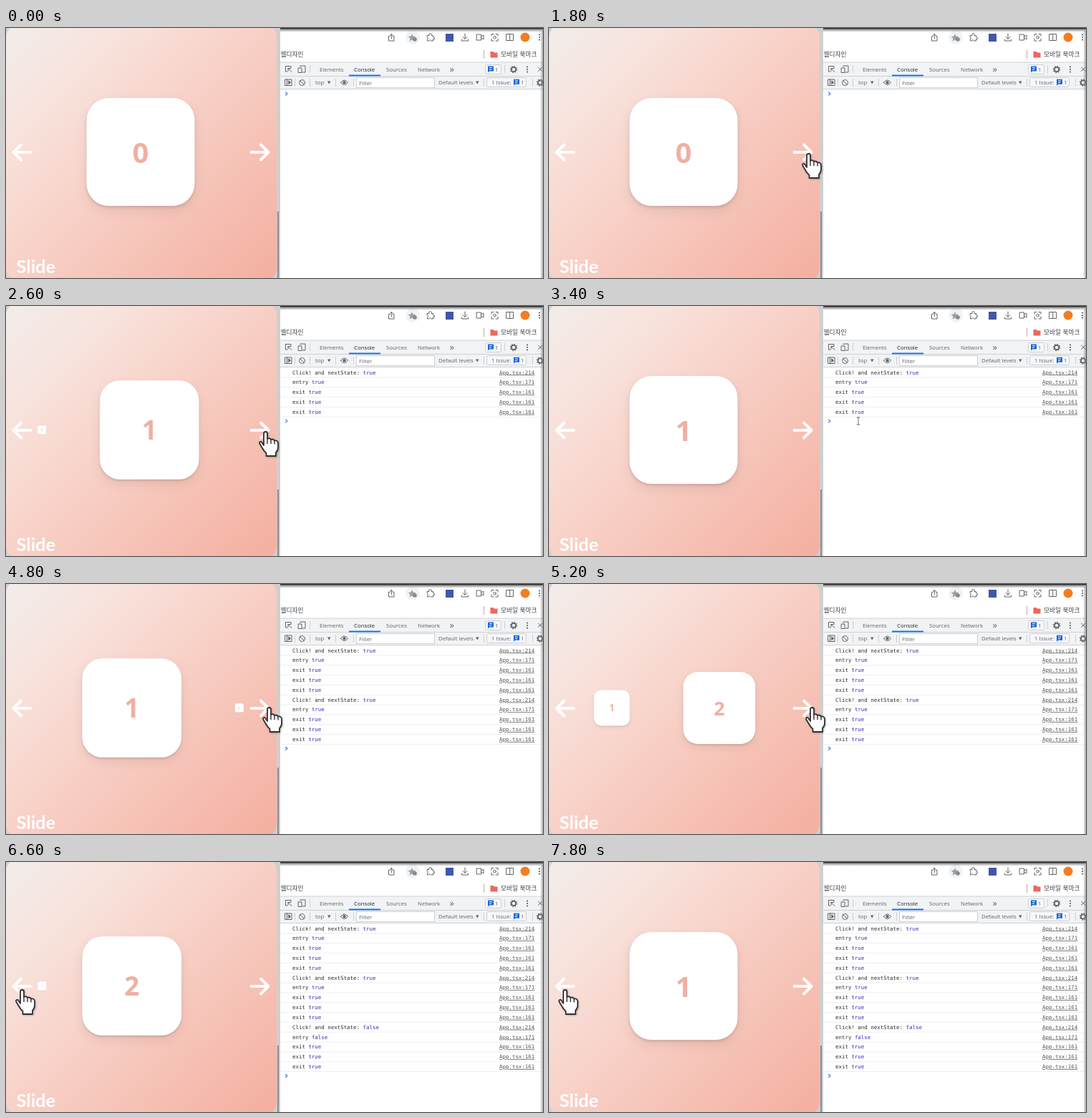
These frames come from a looping animation (750 px wide and 350 px high, 8000 ms). An HTML page:

```html
<!DOCTYPE html>
<html lang="ko">
<head>
<meta charset="utf-8">
<title>Slide</title>
<style>
  html, body { margin: 0; width: 100%; height: 100%; overflow: hidden; background: #fff; }
  svg { display: block; width: 750px; height: 350px; }
  text { white-space: pre; }
  .ui { font: 7.8px "Open Sans", "Noto Sans", sans-serif; fill: #5f6368; }
  .ko { font: 8.7px "Noto Sans CJK KR", "Noto Sans CJK", sans-serif; fill: #3c4043; }
  .log { font: 7.45px "DejaVu Sans Mono", monospace; fill: #303030; }
  .log .value { fill: #3a32b4; }
  .log .link { fill: #555; text-decoration: underline; }
  .title { font: 700 25.5px Lato, sans-serif; fill: #fff; }
  .digit { font: 700 40px "Open Sans", "Noto Sans", sans-serif; fill: #efb0a3; text-anchor: middle; }
  .card { filter: drop-shadow(0 2px 2px #0002) drop-shadow(0 7px 8px #00000012); }
  .icon { fill: none; stroke: #5f6368; stroke-linecap: round; stroke-linejoin: round; }
  .arrow { fill: none; stroke: #fff; stroke-width: 4; stroke-linecap: round; stroke-linejoin: round; opacity: .93; }
  .hand { fill: #fff; stroke: #303035; stroke-width: 1.8; stroke-linejoin: round; }
  .hand, #pointer { filter: drop-shadow(1px 1px 1px #0004); }
</style>
</head>
<body>
<svg viewBox="0 0 750 350">
  <defs>
    <linearGradient id="peach" gradientUnits="userSpaceOnUse" x1="5" y1="-9" x2="372" y2="358">
      <stop offset="0" stop-color="#f1edeb"/>
      <stop offset=".22" stop-color="#f8e3dd"/>
      <stop offset=".5" stop-color="#f8d0c6"/>
      <stop offset="1" stop-color="#f4ae9f"/>
    </linearGradient>
    <linearGradient id="topShade" x2="0" y2="1">
      <stop offset="0" stop-color="#000"/>
      <stop offset=".3" stop-color="#333" stop-opacity=".6"/>
      <stop offset="1" stop-color="#777" stop-opacity="0"/>
    </linearGradient>
    <linearGradient id="sideShade">
      <stop offset="0" stop-color="#777" stop-opacity="0"/>
      <stop offset="1" stop-color="#777" stop-opacity=".65"/>
    </linearGradient>
    <g id="gear" class="icon">
      <circle r="3.1" stroke-width="1.7"/>
      <circle r="4.5" stroke-width="1.5" stroke-dasharray="1.5 2.03" stroke-linecap="butt"/>
    </g>
    <g id="dots" fill="#4b4f54">
      <circle cy="-3.4" r="1"/><circle r="1"/><circle cy="3.4" r="1"/>
    </g>
    <g id="issue">
      <path d="M-4-4H4V3H-2L-4 5Z" fill="#1a67d8"/>
      <path d="M-2-1.8H2M-2 .8H1" stroke="#fff"/>
    </g>
  </defs>

  <!-- page -->
  <rect width="384" height="350" fill="#cfcfcf"/>
  <rect x="0" y="-5" width="378" height="359" rx="18" fill="url(#peach)"/>
  <rect x="379" y="257" width="2" height="93" fill="#8b8b8b"/>
  <path class="arrow" d="M34.5 174H11M21 163.5L10.5 174L21 184.500"/>
  <path class="arrow" d="M342.500 174H366M356 163.500L366.500 174L356 184.500"/>
  <text class="title" x="14.500" y="343">Slide</text>
  <g id="cards"></g>

  <!-- browser toolbar -->
  <rect x="383" width="367" height="350" fill="#fff"/>
  <circle cx="568" cy="13" r="10" fill="#f1f3f4"/>
  <g class="icon">
    <path d="M536 11.500H534.500V18H542V11.500H540.500M538.300 15V8.500M536.300 10.500L538.300 8.500L540.300 10.500"/>
    <path d="M588.500 10.500H591Q590 7.500 592.500 7.500T594 10.500H596.500V13Q599 13 598.500 15T596.500 15.500V18H593.500Q592 15 590.500 18H588.500V15.500Q591 14 588.500 13Z"/>
    <path d="M641 8V15M638 12.500L641 15.500L644 12.500M636.500 16V18H645.500V16"/>
    <path d="M657.500 9H663.500V17H657.500ZM663.500 12L667 10V16L663.500 14"/>
    <path d="M678 11V8.500H681M684 8.500H687V11M687 15V18H684M681 18H678V15"/>
    <circle cx="682.500" cy="13.200" r="1.800"/>
    <path d="M699 8.500H708.500V17.500H699ZM703.700 8.500V17.500"/>
  </g>
  <path d="M567 8L568.500 11.500L572.500 12L569.500 14.500L570.500 18.500L567 16.500L563.500 18.500L564.500 14.500L561.500 12L565.500 11.500Z" fill="#9aa0a6"/>
  <circle cx="571" cy="16" r="2.800" fill="#858a90"/>
  <rect x="614" y="8" width="11" height="11" fill="#4057a8"/>
  <circle cx="725" cy="13" r="6.500" fill="#f57c1f"/>
  <use href="#dots" x="745" y="13"/>
  <text class="ko" x="383.500" y="40">웹디자인</text>
  <path d="M667.500 31V43" stroke="#d3a29d"/>
  <path d="M676.500 33H680.500L682 34.500H686.500V41.500H676.500Z" fill="#ee675c"/>
  <text class="ko" x="691" y="40">모바일 북마크</text>

  <!-- devtools bars -->
  <rect x="383" y="48" width="367" height="38" fill="#f1f3f4"/>
  <path d="M383 48H750M383 67.500H750M383 85.500H750" stroke="#cfd2d6"/>
  <path d="M424.500 52V63M696.500 52V63M403.500 71V82M424.500 71V82M460.500 71V82M485.500 71V82M667.500 71V82M735.500 71V82" stroke="#cdd0d4"/>
  <rect x="479" y="65.500" width="44" height="2" fill="#1a73e8"/>
  <g class="icon">
    <path d="M393 61H390.500V53.500H398V56M394 56.500L399 61.500M394 60V56.500H397.500"/>
    <path d="M411 54V53H418V62H414M408.500 56H413V62.500H408.500Z"/>
    <path d="M390 72H399V80.500H390ZM392.500 72V80.500"/>
    <path d="M395 74L397.500 76.200L395 78.500Z" fill="#5f6368"/>
    <circle cx="413.500" cy="76.500" r="4"/><path d="M410.700 73.700L416.300 79.300"/>
    <path d="M467.500 76.300Q472.500 69.500 477.500 76.300Q472.500 83 467.500 76.300Z"/>
    <circle cx="472.500" cy="76.300" r="1.700" fill="#5f6368"/>
    <path d="M743.500 55L749 60.500M749 55L743.500 60.500"/>
  </g>
  <g fill="#fff" stroke="#cdd0d4">
    <rect x="489.500" y="69.500" width="109" height="14"/>
    <rect x="669.500" y="51.500" width="22" height="13" rx="2" fill="#f5f7fa"/>
    <rect x="671.500" y="69.500" width="55" height="13" rx="2" fill="#f5f7fa"/>
  </g>
  <use href="#issue" x="677" y="57.500"/>
  <use href="#issue" x="713" y="75.800"/>
  <use href="#gear" x="709" y="58"/>
  <use href="#gear" x="746" y="76.500"/>
  <use href="#dots" x="728" y="58"/>
  <path d="M449 74.500H453.500L451.200 78.500ZM656 74.500H660.500L658.200 78.500Z" fill="#5f6368"/>
  <g class="ui">
    <text x="438" y="61">Elements</text>
    <text x="486" y="61" fill="#202124">Console</text>
    <text x="531" y="61">Sources</text>
    <text x="575" y="61">Network</text>
    <text x="619.500" y="62" font-size="13" style="font-size:13px">»</text>
    <text x="683" y="61">1</text>
    <text x="432" y="79">top</text>
    <text x="493" y="79.500">Filter</text>
    <text x="604" y="79">Default levels</text>
    <text x="678" y="79">1 Issue:</text>
    <text x="719" y="79">1</text>
  </g>

  <g id="rows"></g>
  <path id="prompt" class="icon" d="M390.500-2L393-.0L390.500 2" style="stroke:#3b78e7;stroke-width:1.200"/>
  <rect x="383" width="367" height="6" fill="url(#topShade)"/>
  <rect x="746" y="4" width="4" height="346" fill="url(#sideShade)"/>

  <g id="cursor">
    <g id="hand" class="hand" transform="translate(-9 -1)">
      <path d="M7 20V3.500Q7 1 9.500 1T12 3.500V11Q15 9 17 12Q20 10.500 22 13.500Q26.500 12.500 27 17V23Q27 27 24 30V35H10.500V31Q7 28 4.500 23L1.200 17.500Q.5 14.500 3.500 15Z"/>
      <path d="M12 11V18M17 12V18M22 13.500V18.500" stroke-width="1.400"/>
    </g>
    <path id="pointer" d="M0 0V22L5 17.500L8.500 25L12 23.500L8.700 16.500H15.500Z" fill="#fff" stroke="#303035" stroke-width="1.400"/>
    <path id="beam" class="icon" d="M-2-5H2M0-5V5M-2 5H2" stroke-width=".9"/>
  </g>
</svg>

<script>
const LOOP = 8000, STEP = 200, SLIDE = 1000, TRAVEL = 150;
const ROW_TOP = 93, ROW_PITCH = 13.82;
const CENTER = { x: 188, y: 173.5 };

const moves = [
  { start: 1800, from: 0, to: 1, next: true },
  { start: 4600, from: 1, to: 2, next: true },
  { start: 6400, from: 2, to: 1, next: false },
];

// time, x, y of the cursor hotspot
const cursorPath = [
  [1000, 470, 310], [1600, 362, 176], [2600, 362, 176], [3200, 432, 161],
  [4000, 432, 161], [4400, 367, 173], [5400, 367, 173], [6200, 22, 179], [LOOP, 22, 179],
];

const byId = id => document.getElementById(id);
const show = (node, on) => node.setAttribute('visibility', on ? 'visible' : 'hidden');
const place = (node, x, y, scale = 1) =>
  node.setAttribute('transform', `translate(${x} ${y}) scale(${scale})`);

byId('cards').innerHTML = [0, 1, 2].map(n => `
  <g class="card"><rect x="-75.5" y="-75.5" width="151" height="151" rx="31" fill="#fff"/>
  <text class="digit" y="15">${n}</text></g>`).join('');
const cards = [...byId('cards').children];

const logLine = (label, value, line) => ({ label, value, line });
const logs = moves.flatMap(({ next }) => [
  logLine('Click! and nextState:', next, 214),
  logLine('entry', next, 171),
  ...Array(3).fill(logLine('exit', true, 161)),
]);
byId('rows').innerHTML = logs.map(({ label, value, line }, i) => {
  const y = ROW_TOP + i * ROW_PITCH;
  return `<g class="log"><text x="400" y="${y + 2.5}">${label} <tspan class="value">${value}</tspan></text>
    <text class="link" x="689" y="${y + 2.5}">App.tsx:${line}</text>
    <path d="M384 ${y + 7}H747" stroke="#efefef"/></g>`;
}).join('');
const rows = [...byId('rows').children];

// cubic-bezier(.42, 0, .58, 1)
function easeInOut(x) {
  if (x <= 0) return 0;
  if (x >= 1) return 1;
  let lo = 0, hi = 1, u;
  for (let i = 0; i < 24; i++) {
    u = (lo + hi) / 2;
    const at = 1.26 * u * (1 - u) ** 2 + 1.74 * u * u * (1 - u) + u ** 3;
    if (at < x) lo = u; else hi = u;
  }
  return u * u * (3 - 2 * u);
}

function drawCards(t) {
  const move = moves.findLast(m => t >= m.start) || moves[0];
  const p = easeInOut((t - move.start) / SLIDE);
  const put = (n, scale, side) => {
    show(cards[n], scale > 0);
    place(cards[n], CENTER.x + side * TRAVEL * (1 - scale), CENTER.y, scale);
  };
  cards.forEach(card => show(card, false));
  put(move.from, 1 - p, -1);
  put(move.to, p, move.next ? 1 : -1);
}

function drawConsole(t) {
  const count = 5 * moves.filter(m => t > m.start).length;
  rows.forEach((row, i) => show(row, i < count));
  place(byId('prompt'), 0, ROW_TOP - 1 + count * ROW_PITCH);
}

function drawCursor(t) {
  const visible = t >= cursorPath[0][0];
  const i = Math.max(1, cursorPath.findIndex(key => key[0] > t));
  const [t0, x0, y0] = cursorPath[i - 1], [t1, x1, y1] = cursorPath[i];
  const k = (t - t0) / (t1 - t0);
  const x = x0 + (x1 - x0) * k, y = y0 + (y1 - y0) * k;
  const onArrow = Math.abs(y - 174) < 16 && (x < 40 || (x > 338 && x < 374));
  const kind = onArrow ? 'hand' : x > 383 ? 'beam' : 'pointer';
  for (const id of ['hand', 'pointer', 'beam']) show(byId(id), visible && id === kind);
  place(byId('cursor'), x, y);
}

function render() {
  const t = Math.floor(((performance.now() + 1) % LOOP) / STEP) * STEP;
  drawCards(t);
  drawConsole(t);
  drawCursor(t);
  requestAnimationFrame(render);
}
render();
</script>
</body>
</html>
```
